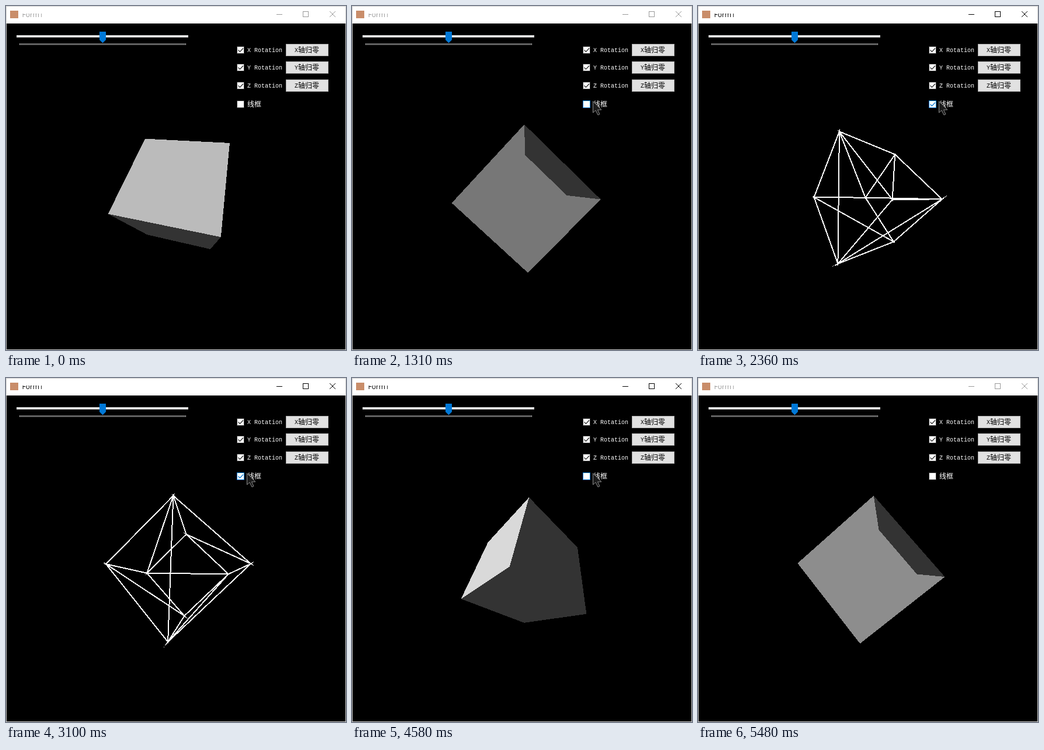
An HTML page for the animation above (5550 ms loop, 582 by 590 pixels).

```html
<!DOCTYPE html>
<html lang="zh">
<head>
<meta charset="utf-8">
<title>Form1</title>
<style>
  html, body { margin: 0; width: 100%; height: 100%; overflow: hidden; background: #000; }
  svg { display: block; width: 582px; height: 590px; }
  .latin { font: 10px "Liberation Mono", "DejaVu Sans Mono", monospace; }
  .cjk { font: 12px "Noto Sans CJK SC", "Noto Sans CJK", sans-serif; }
  .caption { font: 12px "Open Sans", "Noto Sans", sans-serif; }
  .crisp { shape-rendering: crispEdges; }
  #bar { --ink: #999; }
  #bar.active { --ink: #000; }
  #bar text { fill: var(--ink); }
  #bar path { stroke: var(--ink); fill: none; }
  .box { fill: #fff; stroke: #333; }
  .tick { fill: none; stroke: #222; stroke-width: 1.2; }
  .hover .box { stroke: #0078d7; }
  .hover .tick { stroke: #0078d7; }
  #wire { fill: none; stroke: #fff; stroke-width: 2; stroke-miterlimit: 13; }
</style>
</head>
<body>
<svg viewBox="0 0 582 590">
  <rect width="582" height="590" fill="#cfcfcf"/>
  <rect x="1" y="30" width="580" height="559"/>
  <g id="bar">
    <rect x="1" y="1" width="580" height="29" fill="#fff"/>
    <rect x="7" y="8" width="14" height="13" fill="#c98d6a"/>
    <clipPath id="cut"><rect x="24" y="13" width="37.5" height="12"/></clipPath>
    <text class="caption" x="27.5" y="19" clip-path="url(#cut)">Form1</text>
    <path class="crisp" d="M463 14.5h10M508.500 9.500h9v9h-9z"/>
    <path d="M554 9l10 10M564 9l-10 10"/>
  </g>

  <rect class="crisp" x="18.5" y="50.5" width="293" height="3" fill="#e7eaea" stroke="#d6d6d6"/>
  <path class="crisp" d="M23 65.500H308" stroke="#c4c4c4" stroke-width="3" stroke-dasharray="1 1"/>
  <path d="M160 44h11v14l-5.500 5.500l-5.500-5.500z" fill="#0078d7"/>
  <g id="panel"></g>

  <g id="cube" class="crisp"></g>
  <path id="wire" class="crisp"/>
  <path id="pointer" d="M.5 .5V20L5 16L9 24L12 22.500L8.500 15H15z" fill="#1c1c1c" stroke="#8a8a8a"/>
</svg>
<script>
const $ = id => document.getElementById(id);

function add(parent, tag, attrs, html = '') {
  const el = document.createElementNS('http://www.w3.org/2000/svg', tag);
  for (const key in attrs) el.setAttribute(key, attrs[key]);
  el.innerHTML = html;
  return parent.appendChild(el);
}

function addCheck(y) {
  const g = add($('panel'), 'g', {});
  add(g, 'rect', { class: 'box crisp', x: 395.5, y: y - 6, width: 12, height: 12 });
  add(g, 'path', { class: 'tick', d: `M397.500 ${y}l3 3l5.500-6` });
  return g;
}

[['X', 75.5], ['Y', 105.5], ['Z', 136.5]].forEach(([axis, y]) => {
  addCheck(y);
  add($('panel'), 'text', { class: 'latin', x: 413, y: y + 3.5, fill: '#fff' }, `${axis} Rotation`);
  add($('panel'), 'rect', { class: 'crisp', x: 479.5, y: y - 10, width: 72, height: 20, fill: '#e1e1e1', stroke: '#adadad' });
  add($('panel'), 'text', { class: 'latin', x: 494, y: y + 3.5 }, axis);
  add($('panel'), 'text', { class: 'cjk', x: 500, y: y + 4.5 }, '轴归零');
});
const wireCheck = addCheck(168.5);
const wireTick = wireCheck.querySelector('.tick');
add($('panel'), 'text', { class: 'cjk', x: 413, y: 173, fill: '#fff' }, '线框');

// Faces in paint order: axis, side, and which way the diagonal runs
const faces = [
  [1, -1, 0], [1, 1, 1],
  [2, -1, 1], [2, 1, 0],
  [0, -1, 0], [0, 1, 1],
].map(([axis, side, turned]) => {
  const ring = [[-1, -1], [1, -1], [1, 1], [-1, 1]].map(([p, q]) => {
    const v = [0, 0, 0];
    v[axis] = side;
    v[(axis + 1) % 3] = p;
    v[(axis + 2) % 3] = q;
    return v;
  });
  return { axis, side, turned, ring, el: add($('cube'), 'polygon', {}) };
});

// Images of the three axes after turning about x, then y, then z
function axesAt(deg) {
  const rad = d => d * Math.PI / 180;
  const s = Math.sin(rad(deg)), c = Math.cos(rad(deg));
  const sz = Math.sin(rad(deg - 44)), cz = Math.cos(rad(deg - 44));
  const spin = ([x, y, z]) => [x * cz - y * sz, x * sz + y * cz, z];
  return [[c, 0, s], [s * s, c, -s * c], [-c * s, s, c * c]].map(spin);
}

function project(v, axes) {
  const [x, y, z] = [0, 1, 2].map(k => v.reduce((sum, n, i) => sum + n * axes[i][k], 0));
  const zoom = 63.8 / (1 + 0.293 * z);
  return `${(298.1 + x * zoom).toFixed(2)},${(329.5 + y * zoom).toFixed(2)}`;
}

function drawCube(deg, wired) {
  const axes = axesAt(deg);
  let lines = '';
  for (const { axis, side, turned, ring, el } of faces) {
    const pts = ring.map(v => project(v, axes));
    const [nx, ny, nz] = axes[axis].map(n => n * side);
    el.style.display = wired || nz >= 0 ? 'none' : '';
    // Lit from the upper left, in front
    const light = -(nx + ny + nz) / Math.sqrt(3);
    const grey = Math.round(Math.max(51, 224 * light - 2));
    el.setAttribute('points', pts.join(' '));
    el.setAttribute('fill', `rgb(${grey},${grey},${grey})`);
    const [a, b, c, d] = turned ? [...pts.slice(1), pts[0]] : pts;
    lines += `M${a}L${b}L${c}ZM${a}L${c}L${d}Z`;
  }
  $('wire').setAttribute('d', wired ? lines : '');
}

const LOOP = 5550, STEPS = 38;
const quick = [3, 6, 18, 21, 28];
const starts = [0, 130];
for (let i = 1; i < STEPS - 1; i++) starts.push(starts[i] + (quick.includes(i) ? 140 : 150));

const rest = [412, 163];
const trail = {
  4: [140, 532], 5: [235, 400], 6: [345, 255], 7: [425, 172], 8: [434, 158],
  33: [400, 250], 34: [360, 400], 35: [330, 516],
};

function show(step) {
  const resting = step >= 9 && step <= 32;
  const wired = step >= 16 && step < 25;
  const at = resting ? rest : trail[step];
  drawCube(-62.3 + 6.66 * step, wired);
  $('bar').classList.toggle('active', step >= 15 && step < 36);
  wireCheck.classList.toggle('hover', resting);
  wireTick.style.display = wired ? '' : 'none';
  $('pointer').style.display = at ? '' : 'none';
  if (at) $('pointer').setAttribute('transform', `translate(${at})`);
}

const origin = performance.now();
let shown = -1;
function tick() {
  const t = (performance.now() - origin) % LOOP;
  let step = STEPS - 1;
  while (starts[step] > t) step--;
  if (step !== shown) show(shown = step);
  requestAnimationFrame(tick);
}
tick();
</script>
</body>
</html>
```
